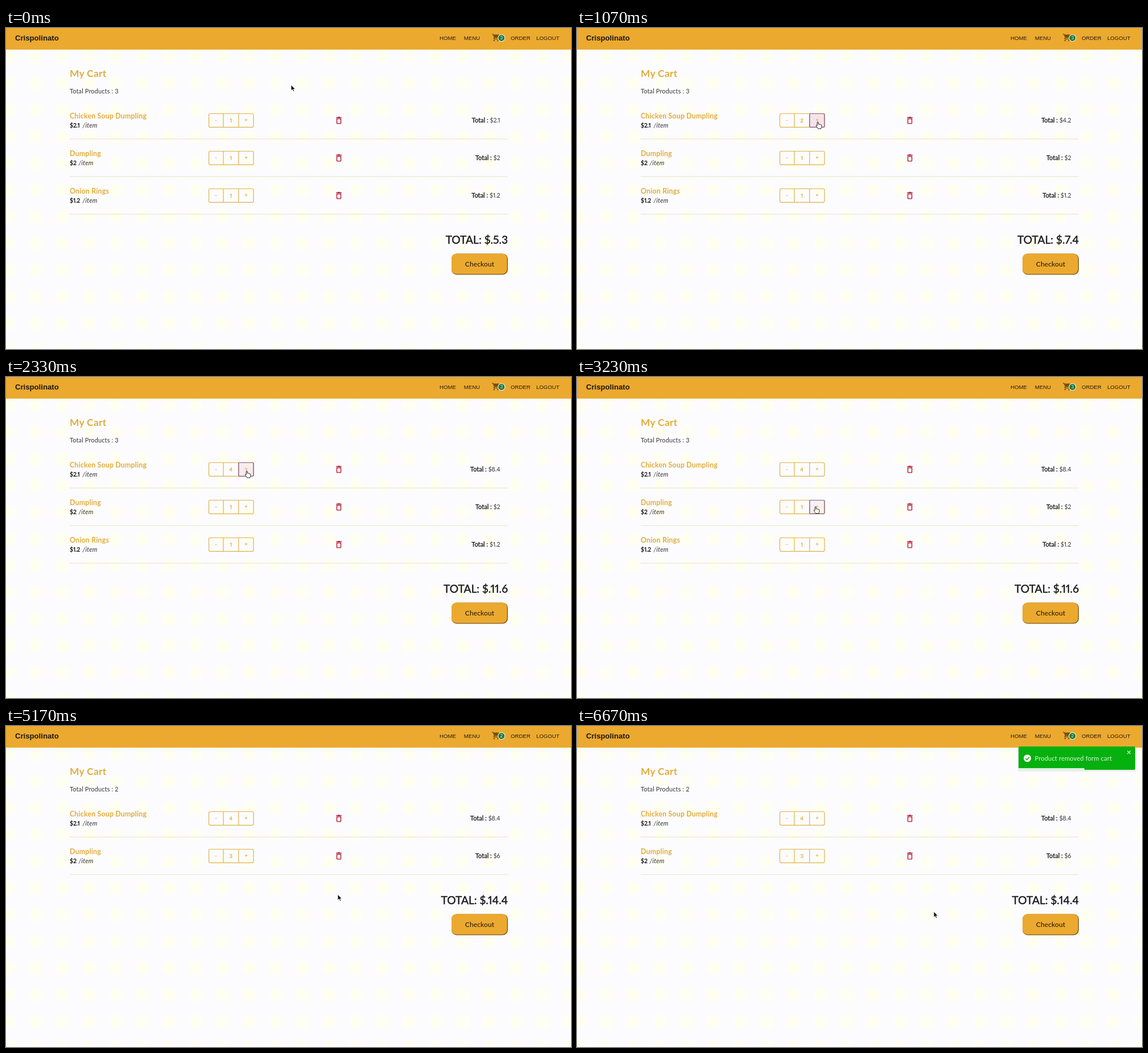
An HTML page for the animation above (6.71 s loop, 993 by 564 pixels).

```html
<!DOCTYPE html>
<html lang="en">
<head>
<meta charset="utf-8">
<title>Cart</title>
<style>
  html, body { margin: 0; width: 100%; height: 100%; overflow: hidden; background: #fcfcfe; }
  svg { display: block; width: 993px; height: 564px; font-family: Lato, sans-serif; font-variant-numeric: proportional-nums; }
  text { white-space: pre; }
  .nav { font: 9.6px "Liberation Sans", Arial, sans-serif; fill: #2a1d10; }
  .brand { font: bold 13.15px "Liberation Sans", Arial, sans-serif; fill: #1d1710; }
  .title { font-size: 17.4px; font-weight: 700; letter-spacing: .3px; fill: #e2ac3c; }
  .count { font-size: 11px; letter-spacing: .12px; fill: #38383c; }
  .name { font-size: 12.4px; font-weight: 700; letter-spacing: .17px; fill: #e2ac3c; }
  .price { font-size: 10.5px; font-weight: 700; letter-spacing: -.2px; fill: #151515; }
  .unit { font-size: 11px; font-style: italic; letter-spacing: .3px; fill: #333; }
  .qty { font-size: 9.5px; font-weight: 700; text-anchor: middle; fill: #e2ac3c; }
  .sum { font-size: 10.5px; text-anchor: end; fill: #333; }
  .sum tspan:first-child { font-size: 11px; fill: #151515; stroke: #151515; stroke-width: .3px; }
  .total { font-size: 19.2px; text-anchor: end; fill: #18181a; stroke: #18181a; stroke-width: .4px; }
  .pay { font-size: 12px; letter-spacing: .12px; text-anchor: middle; fill: #1c1509; }
  .note { font-size: 11.2px; letter-spacing: .12px; fill: #d9f5d9; }
  .badge { font-size: 8px; text-anchor: middle; fill: #e6f3e6; }
</style>
</head>
<body>
<svg viewBox="0 0 993 564">
  <defs>
    <radialGradient id="glow">
      <stop offset=".45" stop-color="#fffff0"/>
      <stop offset="1" stop-color="#fffff0" stop-opacity="0"/>
    </radialGradient>
    <pattern id="cloth" width="46.9" height="46.9" patternUnits="userSpaceOnUse" x="-18.5" y="73.5">
      <rect x="8" y="8" width="31" height="31" fill="url(#glow)"/>
    </pattern>
    <path id="bin" fill="#b3122c" fill-rule="evenodd" transform="scale(.7)" d="M6 19c0 1.1.9 2 2 2h8c1.1 0 2-.9 2-2V7H6zM8 9h8v10H8zM15.5 4l-1-1h-5l-1 1H5v2h14V4z"/>
  </defs>
  <rect width="993" height="564" fill="#fcfcfe"/>
  <rect width="993" height="564" fill="url(#cloth)"/>
  <rect width="993" height="38" fill="#eba92f"/>
  <text class="brand" x="16" y="22">Crispolinato</text>
  <g class="nav">
    <text x="762" y="20.5">HOME</text>
    <text x="804.8" y="20.5">MENU</text>
    <text x="887" y="20.5">ORDER</text>
    <text x="932" y="20.5">LOGOUT</text>
  </g>
  <path fill="#74500f" transform="translate(853.4 9) scale(.65)" d="M1 2v2h2l3.6 7.6-1.4 2.4C4.500 15.400 5.500 17 7 17h12v-2H7.400l1-2h7.200c.7 0 1.400-.4 1.700-1L21 5.500c.4-.7-.1-1.500-.9-1.500H5.200l-.9-2zM7 18a2 2 0 1 0 0 4a2 2 0 1 0 0-4zM17 18a2 2 0 1 0 0 4a2 2 0 1 0 0-4z"/>
  <circle cx="870.8" cy="17.500" r="6" fill="#1d7840" stroke="#f3ead0" stroke-width="1.200"/>
  <text class="badge" id="badge" x="870.8" y="20.400"></text>

  <text class="title" x="112" y="86">My Cart</text>
  <text class="count" id="count" x="112" y="115"></text>
  <g id="rows"></g>
  <g id="foot">
    <text class="total" id="total" x="882" y="379"></text>
    <rect x="783" y="396.500" width="99" height="37" rx="9" fill="#7c581a"/>
    <rect x="783" y="396.500" width="97.700" height="35.700" rx="8.500" fill="#eba92f"/>
    <text class="pay" x="832.500" y="419.300">Checkout</text>
  </g>

  <g id="toast">
    <rect x="775" y="38" width="207" height="42" rx="3" fill="#000" opacity=".06"/>
    <rect x="776" y="36" width="205" height="41" rx="2.500" fill="#06b00e"/>
    <rect id="bar" x="776" y="74" height="3" fill="#fff" opacity=".85"/>
    <circle cx="791.500" cy="56.700" r="6.500" fill="#fff"/>
    <path d="M788.300 57l2.400 2.400 4.300-5" fill="none" stroke="#06b00e" stroke-width="1.500"/>
    <text class="note" x="804.500" y="60.600">Product removed form cart</text>
    <path d="M967.200 43.500l5.600 5.600m0-5.600l-5.600 5.600" stroke="#d9f5d9" stroke-width="1.300"/>
  </g>
  <g id="cursor">
    <path id="arrow" fill="#111" stroke="#fff" stroke-width=".8" d="M0 0v10l2.300-2 1.700 3.600 1.700-.8-1.600-3.400h3.200z"/>
    <path id="hand" fill="#fff" stroke="#222" stroke-width="1" stroke-linejoin="round" d="M-1.300 0c0-1.400 2-1.400 2 0v3.200c.8-.7 1.800-.4 2 .3.800-.5 1.700-.1 1.900.6.900-.4 1.800.1 1.800 1v2.400c0 1.700-1 2-1 3.500H.2c-.4-1.600-2-2.700-3.300-4.800-.7-1.200.7-1.900 1.800-.6z"/>
  </g>
</svg>
<script>
const LOOP = 6710, REMOVED = 5050, TOAST = 5080, BAR = 5800;
const $ = id => document.getElementById(id);
const items = [
  { name: "Chicken Soup Dumpling", price: 2.1, clicks: [980, 1500, 2030] },
  { name: "Dumpling", price: 2, clicks: [3930, 4330] },
  { name: "Onion Rings", price: 1.2, clicks: [] }
];
// time, x, y of the pointer's hot spot
const route = [
  [0, 501, 100], [120, 501, 100], [720, 423.5, 166], [2600, 423.5, 166],
  [3250, 419.500, 229], [4420, 419.500, 229], [4880, 583, 296], [5680, 583, 296],
  [6350, 627, 326], [LOOP, 627, 326]
];

$("rows").innerHTML = items.map((item, i) => {
  const unitX = 112 + (item.price === 2 ? 15.500 : 22.500);
  return `<g transform="translate(0 ${i * 66})">
    <text class="name" x="112" y="159">${item.name}</text>
    <text class="price" x="112" y="175">$${item.price}</text>
    <text class="unit" x="${unitX}" y="175">/item</text>
    <g fill="none" stroke="#e0b14a" stroke-width="1.200">
      <rect x="356.500" y="150.500" width="78.500" height="23.800" rx="2.500"/>
      <path d="M382 150.500v23.800M408.800 150.500v23.800"/>
    </g>
    <rect class="hover" x="408.800" y="150.500" width="26.200" height="23.800" rx="1.500" stroke="#7f5a86" stroke-width="1.200"/>
    <g class="qty">
      <text x="369" y="165.300">-</text><text class="num" x="395.200" y="165.500"></text><text x="422" y="165.300">+</text>
    </g>
    <use href="#bin" x="576.600" y="153.900"/>
    <text class="sum" x="868.500" y="166.300"><tspan>Total : </tspan><tspan class="amount"></tspan></text>
    <path d="M112 195h770" stroke="#e5e3c0"/>
  </g>`;
}).join("");
const rows = [...$("rows").children];

const easeOut = p => 1 - (1 - p) ** 3;
const smooth = p => p * p * (3 - 2 * p);
const money = v => +v.toFixed(2);
const show = (el, on) => el.setAttribute("visibility", on ? "visible" : "hidden");

function pointer(t) {
  const k = Math.max(1, route.findIndex(p => p[0] > t));
  const [a, x, y] = route[k - 1], [b, u, v] = route[k];
  const p = smooth((t - a) / (b - a));
  return [x + (u - x) * p, y + (v - y) * p];
}

// Slide-in from the right with two small rebounds
function bounce(p) {
  const keys = [[0, 3000], [.6, -25], [.75, 10], [.9, -5], [1, 0]];
  if (p >= 1) return 0;
  const k = keys.findIndex(key => key[0] > p);
  const [a, x] = keys[k - 1], [b, y] = keys[k];
  return x + (y - x) * easeOut((p - a) / (b - a));
}

function draw(t) {
  const removed = t >= REMOVED, [x, y] = pointer(t);
  let total = 0, link = false;
  items.forEach((item, i) => {
    const row = rows[i], gone = removed && i === 2, top = 150 + i * 66;
    row.style.display = gone ? "none" : "";
    if (gone) return;
    const past = item.clicks.filter(c => c <= t), qty = 1 + past.length;
    const inRow = y > top && y < top + 25;
    const over = inRow && x > 408 && x < 436;
    const ripple = past.length ? Math.max(0, 1 - (t - past.at(-1)) / 500) : 0;
    const hover = row.querySelector(".hover");
    show(hover, over);
    hover.setAttribute("fill", `rgba(${over && ripple ? "200,70,110" : "150,50,160"},${.06 + .09 * ripple})`);
    row.querySelector(".num").textContent = qty;
    row.querySelector(".amount").textContent = "$" + money(qty * item.price);
    total += qty * item.price;
    link ||= over || inRow && (x > 356 && x < 382 || x > 577 && x < 593);
  });
  $("total").textContent = "TOTAL: $." + money(total);
  $("badge").textContent = removed ? 2 : 3;
  $("count").textContent = "Total Products : " + (removed ? 2 : 3);
  $("foot").setAttribute("transform", `translate(0 ${removed ? -66 : 0})`);

  const p = (t - TOAST) / 700;
  show($("toast"), p >= 0);
  if (p >= 0) {
    $("toast").setAttribute("transform", `translate(${bounce(p)} 0)`);
    $("bar").setAttribute("width", 205 * (1 - Math.max(0, t - BAR) / 2000));
  }
  $("cursor").setAttribute("transform", `translate(${x} ${y})`);
  show($("hand"), link);
  show($("arrow"), !link);
}

const start = performance.now();
function tick() {
  draw((performance.now() - start) % LOOP);
  requestAnimationFrame(tick);
}
tick();
</script>
</body>
</html>
```
